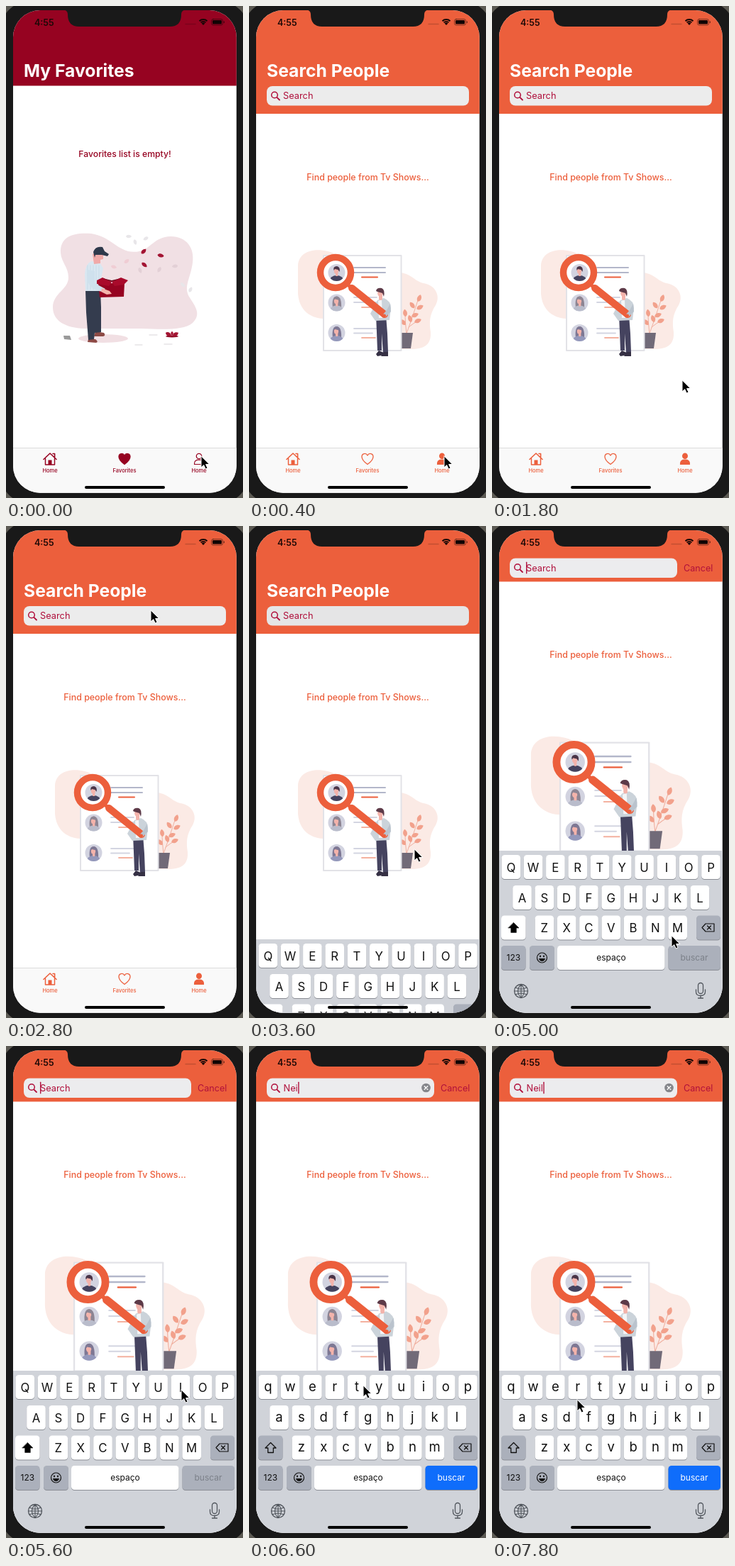
These frames come from a looping animation (334x694 px, 8 s). An HTML page with a canvas:

```html
<!DOCTYPE html>
<html lang="en">
<head>
<meta charset="utf-8">
<title>Search people</title>
<style>
html, body { margin: 0; width: 100%; height: 100%; overflow: hidden; background: #1a1a1a; }
canvas { display: block; width: 334px; height: 694px; }
</style>
</head>
<body>
<canvas id="stage"></canvas>
<script>
const W = 334, H = 694, LOOP = 8000, STEP = 200;
const RED = '#960321', ORANGE = '#ec5f3c', BERRY = '#b0103c', NAVY = '#45435f', SKIN = '#f3b3ab';
const QUERY = 'Neil';
const TYPED_AT = [6000, 6200, 6400, 7000];
const canvas = document.getElementById('stage');
const c = canvas.getContext('2d');
const dpr = window.devicePixelRatio || 1;
canvas.width = W * dpr;
canvas.height = H * dpr;

// Pointer tip: time, x, y
const PATH = [
  [0, 275, 635], [1600, 275, 635], [1800, 268, 528], [2200, 245, 290], [2600, 207, 126],
  [2800, 204, 119], [3400, 204, 119], [3600, 233, 456], [3800, 246, 560], [4200, 252, 607],
  [4800, 254, 606], [5200, 252, 550], [5600, 247, 485], [5800, 258, 558], [6000, 260, 563],
  [6200, 246, 483], [6400, 258, 520], [6600, 161, 479], [6800, 98, 480], [7000, 92, 482],
  [7400, 102, 489], [7800, 120, 499]
];

function pointerAt(t) {
  const i = PATH.findIndex(p => p[0] > t);
  if (i < 0) return PATH[PATH.length - 1].slice(1);
  const [a, b] = [PATH[i - 1], PATH[i]];
  const k = (t - a[0]) / (b[0] - a[0]);
  return [a[1] + (b[1] - a[1]) * k, a[2] + (b[2] - a[2]) * k];
}

function shape(d, fill, stroke, width = 1) {
  const p = new Path2D(d);
  if (fill) { c.fillStyle = fill; c.fill(p); }
  if (stroke) { c.strokeStyle = stroke; c.lineWidth = width; c.stroke(p); }
}
function box(x, y, w, h, r, fill) {
  c.beginPath();
  c.roundRect(x, y, w, h, r);
  c.fillStyle = fill;
  c.fill();
}
function oval(x, y, rx, ry, fill, turn = 0) {
  c.beginPath();
  c.ellipse(x, y, rx, ry, turn, 0, 7);
  c.fillStyle = fill;
  c.fill();
}
function ring(x, y, r, color, width) {
  c.beginPath();
  c.arc(x, y, r, 0, 7);
  c.strokeStyle = color;
  c.lineWidth = width;
  c.stroke();
}
function text(s, x, y, size, color, weight = 400, align = 'left') {
  c.font = `${weight} ${size}px Inter, "Liberation Sans", sans-serif`;
  c.fillStyle = color;
  c.textAlign = align;
  c.fillText(s, x, y);
}
function at(x, y, draw, scale = 1) {
  c.save();
  c.translate(x, y);
  c.scale(scale, scale);
  draw();
  c.restore();
}
function leaf(x, y, size, turn, color) {
  c.save();
  c.translate(x, y);
  c.rotate(turn);
  c.scale(size, size);
  shape('M-1 0C-.6-.8.5-.7 1 0C.5.7-.6.8-1 0', color);
  c.restore();
}

function statusBar() {
  text('4:55', 40, 27.5, 12.5, '#1c0907', 600);
  shape('M253 25.5H267', null, 'rgba(0,0,0,.18)', 1.5);
  c.lineCap = 'butt';
  for (const r of [3, 6, 9]) {
    c.beginPath();
    c.arc(278, 27, r - 1, -2.33, -.81);
    c.strokeStyle = '#160705';
    c.lineWidth = r === 3 ? 3 : 2;
    c.stroke();
  }
  c.lineCap = 'round';
  c.beginPath();
  c.roundRect(289.5, 18.5, 16, 8.5, 2.5);
  c.strokeStyle = 'rgba(0,0,0,.45)';
  c.lineWidth = 1;
  c.stroke();
  box(291, 20, 13, 5.5, 1.2, '#100404');
  box(306.7, 21.2, 1.3, 3, .6, 'rgba(0,0,0,.5)');
}

function tabBar(color, active) {
  box(10, 623, 316, 64, 0, '#f9f9f9');
  box(10, 623, 316, 1, 0, '#dcdcdc');
  const heart = 'M0 7.5C-5 4-8-.2-8-3.2C-8-8.2-2-9 0-5C2-9 8-8.2 8-3.2C8-.2 5 4 0 7.5Z';
  const bust = 'M-6.5 7.5C-7 2.5-4 1.2 0 1.2S7 2.5 6.5 7.5Z';
  at(62, 639, () => {
    shape('M-9 .5L0-8L9 .5M4-7.5H6.6V-2', null, color, 1.6);
    shape('M-6.5-.5V8H6.5V-.5', null, color, 1.5);
    shape('M-2.5 8V1.5H2.5V8Z', color);
  });
  at(167, 639, () => shape(heart, active === 1 ? color : null, color, 1.3));
  at(272, 639, () => {
    if (active === 2) oval(0, -4.3, 4, 4.3, color);
    else ring(0, -4, 3.7, color, 1.3);
    shape(bust, active === 2 ? color : null, color, 1.2);
  });
  ['Home', 'Favorites', 'Home'].forEach((s, i) => text(s, 62 + 105 * i, 658, 7.5, color, 500, 'center'));
}

function emptyBoxArt() {
  shape('M77 348C76 325 95 319 120 321C150 325 160 352 188 346C205 342 208 326 232 325C255 325 266 342 263 362C260 385 250 395 258 410C268 425 275 435 263 447C250 458 220 456 190 455L110 455C85 454 66 445 66 425C66 405 88 400 88 383C88 368 78 362 77 348Z', '#f1e0e4');
  oval(137, 469, 35, 6, '#f1dfe3');
  [[173, 325], [182, 333], [197, 328], [249, 393], [260, 400]].forEach(([x, y], i) => leaf(x, y, 4, i * 1.3, '#e8e6e9'));
  [[170, 360], [152, 368], [189, 373], [216, 372], [238, 367]].forEach(([x, y], i) => leaf(x, y, 4.2, i * .9 - .6, i < 2 ? '#f0cdd4' : '#e3d0d6'));
  [[194, 346, -.8], [218, 352, .2], [195, 365, .7]].forEach(([x, y, a]) => leaf(x, y, 4.6, a, '#a31533'));
  shape('M202 464H213M182 478H192M223 477H234', null, '#e6e3e6', 1.3);
  shape('M81 465L90 465L92 471L82 470Z', '#9a9a9a');
  oval(234, 466, 9, 1.5, '#8f0b25');
  leaf(229, 463, 4.5, .5, '#a31533');
  leaf(239, 463, 4.5, -.5, '#a31533');
  leaf(234, 462, 3, 1.57, '#a31533');
  // legs and shoes
  shape('M126 459L138 461Q141 465 137 466L124 466Z', '#8d4a45');
  shape('M116 470L126 470Q131 474 127 475L115 474Z', '#8d4a45');
  shape('M112 400L133 400L134 425L134 460L125 461L124 470L116 471L113 432Z', '#343c4e');
  // body and head
  shape('M120 360Q112 364 111 378L112 402L134 402L134 384L137 370L132 362Z', '#d9e7f1');
  for (let x = 115; x < 135; x += 4) shape(`M${x} 366V400`, null, '#bcd3e3', .6);
  shape('M122 350L124 364L133 363L133 358L137 357L137 349L128 346Z', '#f0a9a8');
  shape('M123 347Q126 338 136 340L139 346L145 350L143 353L135 351L126 351L125 355Z', '#2f394b');
  // open box
  shape('M130 391L167 391L166 410L132 411Z', RED);
  shape('M128 387L136 383L149 389L145 395L128 392ZM149 389L162 383L172 387L166 393L153 395Z', '#a90a2b');
  shape('M136 384L149 389L162 384L149 387Z', '#6c031a');
  shape('M115 372L116 390Q119 400 136 403L140 399L125 391L125 374Z', '#cfe1ed');
  shape('M135 398L146 402L149 406L142 407L134 403Z', '#f3b3ab');
}

function avatar(y, hair, top, longHair) {
  c.save();
  c.beginPath();
  c.arc(123.5, y, 12, 0, 7);
  c.clip();
  box(110, y - 14, 28, 28, 0, '#d2d3e0');
  if (longHair) shape(`M118 ${y + 7}Q116 ${y - 9} 124 ${y - 9}Q131 ${y - 8} 130 ${y + 8}Z`, hair);
  oval(123.5, y + 12, 10, 8, top);
  box(122, y, 3.4, 5, 1, SKIN);
  oval(123, y - 2.5, 3.2, 4.2, SKIN);
  shape(`M119.5 ${y - 3}Q118 ${y - 9} 124 ${y - 9}Q129 ${y - 8} 127.5 ${y - 1}L125.5 ${y - 4}L121 ${y - 5}Z`, hair);
  c.restore();
}

function searchArt() {
  shape('M69 365C71 346 92 341 111 346C137 351 137 380 145 400C148 430 125 441 104 441C78 439 68 420 69 400Z', '#fbeae5');
  shape('M210 376C228 376 234 389 246 391C264 394 270 410 263 422C254 436 254 446 256 460C257 478 247 484 228 484L205 484Z', '#fbeae5');
  // plant
  shape('M222 462Q230 440 239 412M222 462Q220 445 220 434M225 453Q231 448 238 444', null, '#f0b0a0', 1);
  [[240, 412, -1.2], [230, 422, -2.2], [241, 425, -.5], [220, 433, -1.7], [234, 436, -.4],
   [217, 446, -2.3], [227, 441, -1.9], [238, 444, -.4]].forEach(([x, y, a]) => leaf(x, y, 5.2, a, '#f2a18c'));
  shape('M212 461L231 461L228 483L215 483Z', '#716a78');
  // list card
  box(104, 351, 111.5, 136, 1, '#e2e2e7');
  box(106, 353, 107.5, 132, 0, '#fff');
  shape('M148 369H192M148 376H192', null, '#b3b7ca', 2);
  shape('M159 382.5H181', null, ORANGE, 2);
  shape('M148 411H180M148 418H180M148 455H180M148 461.5H174', null, '#d3d5e1', 1.8);
  shape('M159 425H178M159 468H178', null, '#f4b19f', 1.8);
  avatar(418.5, '#8d8593', '#b9bccb', true);
  avatar(461, '#7e7894', '#9498bb', true);
  // standing figure
  shape('M179 436L193 436L195 462L196 488L189 490L187 462L187 486L181 486L180 460Z', NAVY);
  shape('M183 486L190 489Q190 493 181 494L179 491ZM190 488L196 488L196 494L186 494Z', '#353044');
  shape('M181 415L190 412Q200 416 200 426L198 443L178 444L171 434Z', '#cbd3da');
  shape('M182 416L187 414L188 440L183 440Z', '#f4f5f7');
  box(183, 406, 5, 9, 2, SKIN);
  oval(185, 405, 3.8, 5, SKIN);
  shape('M179 402Q180 397 187 398Q192 400 190 410L188 405L181 403Z', '#5d3a48');
  // magnifier
  c.lineCap = 'round';
  shape('M139 393L190 434', null, ORANGE, 5);
  shape('M145 398L191 435', null, ORANGE, 10);
  oval(122, 376, 22, 22, '#fff');
  avatar(376, '#4a3548', NAVY);
  ring(122, 376, 21.5, ORANGE, 9.5);
  shape('M199 420L200 431L192 439L188 436L194 429Z', '#bac3cd');
  oval(190, 437, 3, 2.4, ORANGE);
}

function glass(x, y) {
  ring(x, y, 4.3, BERRY, 1.5);
  shape(`M${x + 3.3} ${y + 3.3}L${x + 7} ${y + 7}`, null, BERRY, 1.8);
}

function searchField(y, width, tint, typed, editing) {
  box(25, y, width, 27.5, 8, tint);
  glass(36, y + 12.5);
  if (typed) {
    text(typed, 48.5, y + 18, 12.8, BERRY);
    at(249.5, y + 13.5, () => {
      oval(0, 0, 6.3, 6.3, '#85868b');
      shape('M-2.3-2.3L2.3 2.3M2.3-2.3L-2.3 2.3', null, '#fff', 1.3);
    });
  } else text('Search', 48, y + 18, 12.8, BERRY);
  if (!editing) return;
  const caret = typed ? 49 + c.measureText(typed).width : 48;
  box(caret, y + 5, 1.4, 17, .7, BERRY);
  text('Cancel', 270, 63.5, 12.6, BERRY);
}

function key(x, y, w, fill = '#fff') {
  box(x, y + 1, w, 34, 4.5, '#8b8e95');
  box(x, y, w, 34, 4.5, fill);
}

function keyboard(top, lower) {
  const gray = '#abb0bb', ink = '#111';
  at(0, top, () => {
    box(10, 0, 316, 240, 0, '#d0d3d9');
    [['QWERTYUIOP', 13.5, 6], ['ASDFGHJKL', 29.2, 49], ['ZXCVBNM', 60.6, 91.5]].forEach(([row, x0, y]) => {
      [...row].forEach((ch, i) => {
        const x = x0 + i * 31.3;
        key(x, y, 26.6);
        text(lower ? ch.toLowerCase() : ch, x + 13.3, y + (lower ? 22.8 : 23.5), lower ? 18.5 : 16.8, ink, 400, 'center');
      });
    });
    key(13, 91.5, 34.5, lower ? gray : '#fff');
    at(30.5, 109, () => shape('M0-7.5L7.5 0H3.8V6.5H-3.8V0H-7.5Z', lower ? null : '#000', '#111', lower ? 1.3 : .6));
    key(288, 91.5, 34, gray);
    at(305, 108.5, () => {
      shape('M-9 0L-4-5.5H8V5.5H-4Z', null, ink, 1.2);
      shape('M-1.5-2.5L3.5 2.5M3.5-2.5L-1.5 2.5', null, ink, 1.2);
    });
    key(13, 134, 34.5, gray);
    text('123', 30.3, 155.3, 12, ink, 400, 'center');
    key(53, 134, 35, gray);
    at(70.5, 151, () => {
      ring(0, 0, 7, ink, 1.2);
      oval(-2.5, -2, 1, 1.4, ink);
      oval(2.5, -2, 1, 1.4, ink);
      shape('M-4.5 1H4.5Q3.5 5 0 5T-4.5 1Z', ink);
    });
    key(92, 134, 151.5);
    text('espaço', 168, 154.5, 12, ink, 400, 'center');
    key(248.5, 134, 73.5, lower ? '#0f6dfb' : gray);
    text('buscar', 285, 154.5, 12, lower ? '#fff' : '#7c8089', 400, 'center');
    at(41, 198, () => {
      ring(0, 0, 9.5, '#50555c', 1.3);
      shape('M0-9.5V9.5M-9.5 0H9.5M-8-5Q0-1 8-5M-8 5Q0 1 8 5M0-9.5Q-9 0 0 9.5M0-9.5Q9 0 0 9.5', null, '#50555c', 1.1);
    });
    at(294, 197, () => {
      c.beginPath();
      c.roundRect(-3.5, -10.5, 7, 15, 3.5);
      c.strokeStyle = '#50555c';
      c.lineWidth = 1.3;
      c.stroke();
      shape('M-6.5-1V2Q-6.5 7.5 0 7.5T6.5 2V-1M0 7.5V11M-3.5 11H3.5', null, '#50555c', 1.3);
    });
  });
}

function title(s) {
  text(s, 25, 100, 24.7, '#fff', 700);
}

function favorites() {
  box(10, 6, 316, 106.5, 0, RED);
  title('My Favorites');
  text('Favorites list is empty!', 167.5, 213, 12.2, RED, 500, 'center');
  emptyBoxArt();
  tabBar(RED, 1);
}

function people(t) {
  const raised = t >= 3800, editing = t >= 4800;
  const typed = QUERY.slice(0, TYPED_AT.filter(k => t >= k).length);
  box(10, 6, 316, editing ? 72.5 : raised ? 106.5 : 146, 0, ORANGE);
  if (!editing) title('Search People');
  if (editing) searchField(45.5, 236, '#ececee', typed, true);
  else if (!raised) searchField(113, 285, t < 3200 ? '#ececec' : '#e5e5e6', '', false);
  text('Find people from Tv Shows...', 167.5, raised ? 185.5 : 246, 12.4, ORANGE, 500, 'center');
  if (raised) at(115.5 - 122 * 1.143, 333 - 376 * 1.143, searchArt, 1.143);
  else searchArt();
  tabBar(ORANGE, 2);
  if (t >= 3600) keyboard(raised ? 458 : 583, typed.length > 0);
}

function render(t) {
  c.setTransform(dpr, 0, 0, dpr, 0, 0);
  c.lineCap = c.lineJoin = 'round';
  box(0, 0, W, H, 0, '#5c5a53');
  box(-8, -7, 350, 709, 42, '#191919');
  c.save();
  c.beginPath();
  c.roundRect(10, 6, 314.8, 680.7, 38);
  c.clip();
  box(10, 6, 316, 681, 0, '#fff');
  if (t < 200) favorites();
  else people(t);
  shape('M80 5Q87 6 87 12Q87 29 103 29H231Q247 29 247 12Q247 6 254 5Z', '#191919');
  statusBar();
  box(111, 677, 113, 4, 2, '#000');
  c.restore();
  at(...pointerAt(t), () => shape('M0 0V16L3.7 12.6L6.2 18L9 16.8L6.6 11.5H11.5Z', '#000', '#fff', 1));
}

function tick(now) {
  render(Math.floor((now % LOOP) / STEP) * STEP);
  requestAnimationFrame(tick);
}
render(0);
requestAnimationFrame(tick);
</script>
</body>
</html>
```
